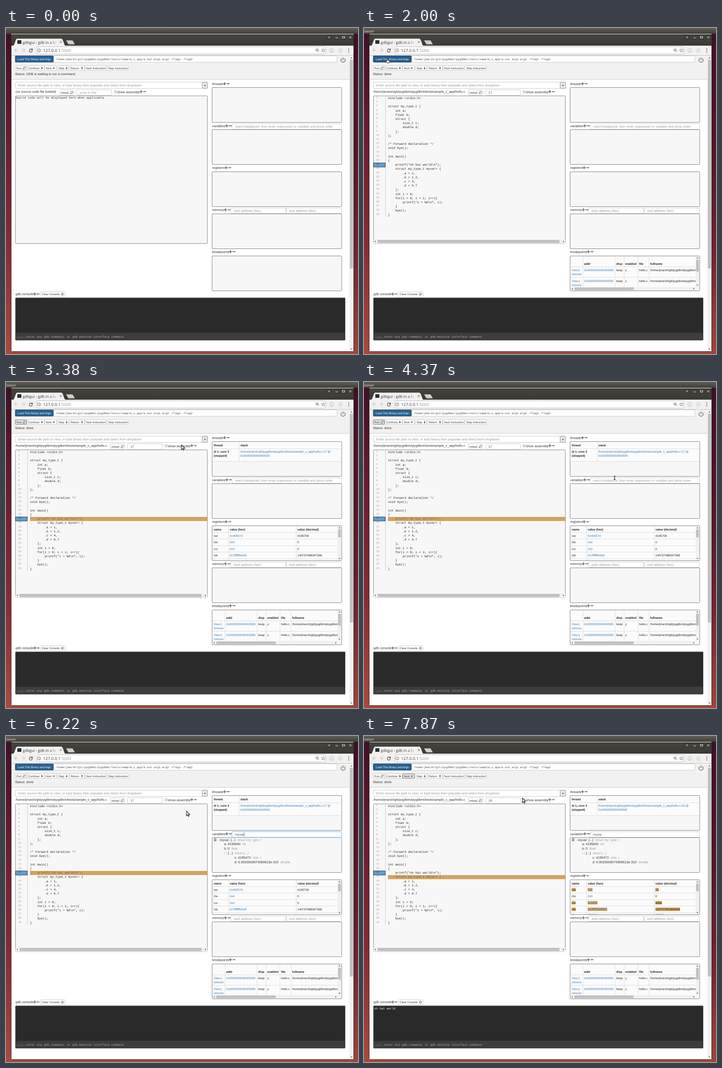
Animation, 778 px wide and 720 px high, one loop 8000 ms. Source, as an HTML page with a canvas:

```html
<!DOCTYPE html>
<html>
<head>
<meta charset="utf-8">
<style>
html, body { margin: 0; width: 100%; height: 100%; overflow: hidden; }
canvas { display: block; }
</style>
</head>
<body>
<canvas id="stage" width="778" height="720"></canvas>
<script>
const ctx = document.getElementById('stage').getContext('2d');
const LOOP = 8000;
const SANS = "'Liberation Sans', Arial, sans-serif";
const MONO = "'Liberation Mono', monospace";
const UI = "'Open Sans', sans-serif";
const BODY = 7.27, CELL = 6.54, SMALL = 6.23;
const INK = '#333', GREY = '#999', LINK = '#337ab7', MARK = '#d2a363';
const APP = '/home/jmarsh/git/pygdbmi/pygdbmi/tests/sample_c_app/';
ctx.textRendering = 'geometricPrecision';

const code = `#include <stdio.h>

struct my_type_t {
    int a;
    float b;
    struct {
        size_t c;
        double d;
    };
};

/* Forward declaration */
void bye();

int main()
{
    printf("oh hai world\\n");
    struct my_type_t myvar= {
        .a = 1,
        .b = 1.2,
        .c = 4,
        .d = 6.7
    };
    int i = 0;
    for(i = 0; i < 1; i++){
        printf("i = %d\\n", i);
    }
    bye();
}`.split('\n');

// label, left, right, icon, icon centre
const buttons = [
  ['Run', 20, 46, 'refresh', 40], ['Continue', 46, 85, 'play', 80],
  ['Next', 85, 112, 'skip', 106], ['Step', 113, 139, 'down', 134],
  ['Return', 140, 174, 'up', 168], ['Next Instruction', 174, 222],
  ['Step Instruction', 223, 271]
];

// time, x, y of the pointer
const path = [
  [250, 72, 94], [700, 64, 80], [1040, 57, 71], [1170, 57, 76], [1430, 52, 68],
  [2130, 52, 68], [2270, 66, 84], [2410, 36, 88], [2690, 36, 88], [2840, 79, 95],
  [2990, 150, 108], [3130, 270, 127], [3380, 388, 139], [3500, 388, 139],
  [3660, 395, 142], [3930, 460, 176], [4400, 560, 214], [4630, 583, 215],
  [5980, 583, 215], [6100, 520, 200], [6220, 399, 166], [6340, 399, 166],
  [6720, 150, 112], [6860, 131, 95], [7000, 97, 88], [7330, 97, 88],
  [7440, 130, 98], [7870, 350, 137], [LOOP, 350, 137]
];

function pointerAt(t) {
  const i = path.findIndex(key => key[0] > t);
  if (i < 1) return null;
  const [a, b] = [path[i - 1], path[i]];
  const k = (t - a[0]) / (b[0] - a[0]);
  return { x: a[1] + (b[1] - a[1]) * k, y: a[2] + (b[2] - a[2]) * k };
}

function text(s, x, y, color = INK, size = BODY, font = SANS, style = '') {
  ctx.font = `${style} ${size}px ${font}`;
  ctx.fillStyle = color;
  ctx.fillText(s, x, y);
  return x + ctx.measureText(s).width;
}

function rect(x, y, w, h, fill) {
  ctx.fillStyle = fill;
  ctx.fillRect(x, y, w, h);
}

function box(x, y, w, h, fill, stroke, r = 1.5) {
  ctx.beginPath();
  ctx.roundRect(x + .5, y + .5, w - 1, h - 1, r);
  ctx.fillStyle = fill;
  ctx.fill();
  ctx.strokeStyle = stroke;
  ctx.lineWidth = 1;
  ctx.stroke();
}

function shape(d, x, y, fill, stroke, width = 1) {
  const p = new Path2D(d);
  ctx.save();
  ctx.translate(x, y);
  if (fill) { ctx.fillStyle = fill; ctx.fill(p); }
  if (stroke) { ctx.strokeStyle = stroke; ctx.lineWidth = width; ctx.stroke(p); }
  ctx.restore();
}

function gradient(y0, y1, ...colors) {
  const g = ctx.createLinearGradient(0, y0, 0, y1);
  colors.forEach((c, i) => g.addColorStop(i / (colors.length - 1), c));
  return g;
}

function ring(x, y, r, color, width = 1) {
  ctx.beginPath();
  ctx.arc(x, y, r, 0, 7);
  ctx.strokeStyle = color;
  ctx.lineWidth = width;
  ctx.stroke();
}

const arrows = {
  up: 'M-2 1L0-1.3L2 1Z', down: 'M-2-1L0 1.3L2-1Z',
  left: 'M1-2L-1.3 0L1 2Z', right: 'M-1-2L1.3 0L-1 2Z'
};

function scrollbar(x, y, w, h, from, to, edge = 4) {
  rect(x, y, w, h, '#f1f1f1');
  if (w > h) {
    rect(from, y + 1, to - from, h - 2, '#c1c1c1');
    shape(arrows.left, x + edge, y + h / 2, '#505050');
    shape(arrows.right, x + w - edge, y + h / 2, '#505050');
  } else {
    rect(x + 1, from, w - 2, to - from, '#c1c1c1');
    shape(arrows.up, x + w / 2, y + edge, '#505050');
    shape(arrows.down, x + w / 2, y + h - edge, '#505050');
  }
}

function icon(name, x, y) {
  const glyphs = {
    play: 'M-2.2-2.6L2.4 0L-2.2 2.6Z',
    skip: 'M-2.2-2.4L1 0L-2.2 2.4ZM1.2-2.4H2V2.4H1.2Z',
    down: 'M-.7-3H.7V0H2.6L0 3L-2.6 0H-.7Z',
    up: 'M-.7 3H.7V0H2.6L0-3L-2.6 0H-.7Z'
  };
  if (name === 'refresh')
    shape('M-2.5-.5A2.5 2.5 0 0 1 2-1.6M2.8-3V-.9H.7M2.5 .5A2.5 2.5 0 0 1-2 1.6M-2.8 3V.9H-.7', x, y, null, '#555', .9);
  else shape(glyphs[name], x, y, '#666');
}

function plusMinus(x, y, gap = 8) {
  shape(`M-3.3 0H3.3M0-3.3V3.3M${gap - 3} 0H${gap + 3}`, x, y, null, '#777', 1.9);
}

function button(label, x, y, w, h, active, focused) {
  box(x, y, w, h, active || focused ? '#e6e6e6' : '#fff', focused ? '#777' : active ? '#adadad' : '#ccc');
  text(label, x + 3, y + h / 2 + 2.2, INK, SMALL);
}

function input(x, y, w, h, value, placeholder, focused) {
  if (focused) box(x - 1, y - 1, w + 2, h + 2, '#fff', '#66afe940', 2);
  box(x, y, w, h, '#fff', focused ? '#8cc3ee' : '#ccc');
  return text(value || placeholder, x + 7, y + h / 2 + 2.8, value ? '#555' : GREY);
}

function desktop(t) {
  rect(0, 0, 12, 720, gradient(12, 720, '#3f1027', '#6c1c30', '#862c36', '#a84a3b'));
  rect(768, 0, 10, 720, gradient(12, 720, '#3f1027', '#551428', '#6e2230', '#a0443a'));
  rect(12, 714, 756, 6, '#a4473a');
  rect(0, 0, 778, 13, gradient(0, 13, '#5f5d55', '#413f3a'));
  if (t >= 2000) text('owser', 0, 10, '#dfdbd2', 8, UI);
  box(11, 14, 758, 701, '#3c3b37', '#2b2a27', 3);
  rect(12, 15, 756, 24, gradient(15, 39, '#45443f', '#3a3935'));
  ['M-1 0H1M0-2V2', 'M-2.5 1.5H2.5', 'M-2.5-2H2.5V2H-2.5Z', 'M-2-2L2 2M2-2L-2 2'].forEach((d, i) => {
    const x = [714, 731, 746, 761][i];
    box(x - 6, 16, 12, 9, '#4a4944', '#2c2b28');
    shape(d, x, 20.5, null, '#dfdbd2');
  });
  shape('M15 39.5C20 39 20 24 25 23.5H122C127 24 128 39 132 39.5Z', 0, 0, '#f2f1f0');
  shape('M133 27.5H147L152 36H138Z', 0, 0, '#cfceca', '#aaa', .5);
  rect(25, 27, 9, 8, '#26323c');
  text('gdbgui - gdb in a br', 37, 34.5, '#333', 8.3, UI);
  const fade = ctx.createLinearGradient(97, 0, 114, 0);
  fade.addColorStop(0, '#f2f1f000');
  fade.addColorStop(1, '#f2f1f0');
  rect(97, 25, 18, 13, fade);
  shape('M-2.3-2.3L2.3 2.3M2.3-2.3L-2.3 2.3', 121, 31, null, '#666');
  rect(12, 39, 756, 22, '#f2f1f0');
  rect(12, 60, 756, 1, '#c4c3c1');
  shape('M4 0H-4M0-4L-4 0L0 4', 23, 49, null, '#ccc', 1.3);
  shape('M-4 0H4M0-4L4 0L0 4', 38, 49, null, '#ccc', 1.3);
  shape('M3-1.5A3.5 3.5 0 1 0 3.4 1M3.5-4V-1H.5', 55, 49.5, null, '#555', 1.3);
  box(68, 41, 639, 17, '#fff', '#bbb', 2);
  ring(73.5, 49.5, 3.6, '#666', .9);
  rect(73, 48.7, 1, 3, '#666');
  rect(73, 47, 1, 1, '#666');
  const end = text('127.0.0.1', 82, 53, '#333', 9.1, UI);
  text(':5000', end, 53, '#999', 9.1, UI);
  ring(687.5, 48.5, 2.7, '#666');
  shape('M2 2L4.5 4.5M-1.4 0H1.4', 687.5, 48.5, null, '#666');
  shape('M0-4L1.2-1.3L4-1.2L1.8.7L2.6 3.6L0 2L-2.6 3.6L-1.8.7L-4-1.2L-1.2-1.3Z', 701, 49.5, null, '#666', .8);
  ring(720, 49.5, 4.4, '#bbb');
  text('{}', 717.7, 51.5, '#bbb', 6);
  ring(739, 49.5, 4.4, '#ccc');
  shape('M-2 2L2-2', 739, 49.5, null, '#ccc', 2);
  for (let i = -1; i < 2; i++) rect(756.7, 48.7 + i * 3.5, 1.8, 1.8, '#555');
  rect(12, 61, 747, 653, '#fff');
  scrollbar(759, 61, 9, 653, 70, 531, 5);
}

function toolbar(t, pointer, focus) {
  const over = (x0, x1, y0, y1) => pointer && pointer.x >= x0 && pointer.x <= x1 && pointer.y >= y0 && pointer.y <= y1;
  rect(12, 61, 747, 52, '#f1f1f1');
  rect(12, 113, 747, 1, '#ccc');
  const onLoad = over(20, 105, 61, 76);
  box(20, 61, 85, 15, onLoad ? '#265c8b' : '#286192', focus === 'Load' ? '#204d74' : '#245580', 1);
  text('Load This Binary and Args', 26, 71, '#fff', SMALL);
  box(105, 61, 627, 15, '#fff', '#ccc', 1);
  text(APP + 'a.out arg1 arg2 -flag1 -flag2', 110, 70.5, '#444', 6.22, MONO);
  shape('M-2.7-3.8A4.7 4.7 0 1 0 2.7-3.8M0-6V0', 745, 71, null, '#666', 1.3);
  let hit = onLoad;
  for (const [label, x0, x1, glyph, gx] of buttons) {
    const active = over(x0, x1, 83, 94);
    hit = hit || active;
    button(label, x0, 83, x1 - x0, 11, active, focus === label);
    if (glyph) icon(glyph, gx, 88.7);
  }
  text('Status: ' + (t < 2000 ? 'GDB is waiting to run a command' : 'done'), 20, 104);
  return hit ? 'hand' : over(499, 742, 211, 223) ? 'beam' : 'arrow';
}

function source(t) {
  const loaded = t >= 2000, dx = loaded ? 112 : 0;
  const line = t >= 7440 ? 18 : t >= 2990 ? 17 : 0;
  input(20, 119, 414, 15, '', 'Enter source file path to view, or load binary then populate and select from dropdown');
  box(433, 119, 13, 15, '#e4e4e4', '#999');
  shape(arrows.down, 439.7, 127, '#333');
  text(loaded ? APP + 'hello.c' : '(no source code file loaded)', 21, 143);
  button('reload', 118 + dx, 136, 33, 13);
  icon('refresh', 145 + dx, 142.7);
  input(156 + dx, 136, 78, 13, loaded ? String(line || 17) : '', 'jump to line');
  box(239 + dx, 138, 6, 6, '#e8e8e8', '#aaa', 1);
  text('show assembly', 246 + dx, 144);
  plusMinus(298.5 + dx, 140.5);
  box(20.4, 149.4, 425.2, 327, '#f7f7f7', '#808080');
  if (!loaded) {
    text('Source code will be displayed here when applicable', 21, 156, INK, CELL, MONO);
    return;
  }
  rect(47, 150, 1, 266, '#ccc');
  box(20.5, 297.5, 27, 10, '#5f9fd3', '#333', 0);
  if (line) rect(53, 298 + (line - 17) * 9.2, 392, 9, MARK);
  code.forEach((s, i) => {
    const y = 157 + i * 9.2, marked = i + 1 === line;
    text(i + 1, 27, y - 2, i === 16 ? '#234' : GREY, 5.6, MONO);
    text(s, 53, y, marked ? '#7a6038' : '#222', 6.74, MONO);
  });
  scrollbar(21, 467, 424, 9, 30, 432);
}

function table(lines, top, bottom, columns, labels, labelY, right) {
  rect(456, top, right - 456, bottom - top, '#fbfbfb');
  for (const y of lines) rect(456, y, right - 456, 1, '#ddd');
  for (const x of columns.slice(1)) rect(x - 3, top, 1, bottom - top, '#ddd');
  labels.forEach((s, i) => text(s, columns[i], labelY, '#222', CELL, SANS, 'bold'));
}

function clipped(x, y, w, h, draw) {
  ctx.save();
  ctx.beginPath();
  ctx.rect(x, y, w, h);
  ctx.clip();
  draw();
  ctx.restore();
}

function threads(stepped) {
  table([147, 175], 132, 175, [459, 518], ['thread', 'stack'], 142, 741);
  text('id 1, core 3', 459, 156, '#222', CELL, SANS, 'bold');
  text('(stopped)', 459, 165, '#222', CELL, SANS, 'bold');
  text(`${APP}hello.c:${stepped ? 18 : 17} @`, 518, 156, LINK, CELL);
  text(stepped ? '0x000000000040058f' : '0x0000000000400585', 518, 165, LINK, CELL);
}

function variables() {
  shape('M-2.5-2H2.5M-1-3H1M-2-1.5V3H2V-1.5M-.7-.5V2M.7-.5V2', 462.3, 229, null, '#666', .9);
  [['- myvar: {...}', 'struct my_type_t', 468], ['a: 4195840', 'int', 482], ['b: 0', 'float', 482],
    ['- : {...}', 'struct {...}', 482], ['c: 4195472', 'size_t', 505], ['d: 6.9533558074389613e-310', 'double', 505]
  ].forEach(([value, type, x], i) => {
    const y = 231.5 + i * 9.8;
    text(type, text(value, x, y) + 4.2, y, GREY, BODY, SANS, 'italic');
  });
}

function registers(changed) {
  const columns = [459, 494.5, 644];
  const rows = changed
    ? ['rax 0xd 13', 'rbx 0x0 0', 'rcx 0x1000 4096', 'rdx 0x7ffff7dd59e0 140737351866848', 'rsi 0x7ffff7 41943']
    : ['rax 0x40057d 4195709', 'rbx 0x0 0', 'rcx 0x0 0', 'rdx 0x7fffffffe0e8 140737488347368'];
  clipped(456, 318, 285, 76, () => {
    table([332, 346, 361, 375, 390], 318, 394, columns, ['name', 'value (hex)', 'value (decimal)'], 327.5, 733);
    rows.forEach((row, i) => row.split(' ').forEach((s, c) => {
      const y = 341.7 + i * 14.4;
      if (changed && i !== 1) {
        ctx.font = `${CELL}px ${SANS}`;
        rect(columns[c], y - 6, ctx.measureText(s).width, 7.5, '#d9a557');
      }
      text(s, columns[c], y, c === 1 ? LINK : '#222', CELL);
    }));
    scrollbar(733, 318, 8, 76, 326, 343);
  });
}

function breakpoints() {
  const columns = [459, 486.5, 557.5, 577.5, 608, 632.5];
  clipped(456, 504, 277, 68, () => {
    table([527, 550], 504, 572, columns, ['', 'addr', 'disp', 'enabled', 'file', 'fullname'], 522.5, 733);
    for (const y of [537, 561]) {
      text(' |', text('View', 459, y, LINK, CELL), y, INK, CELL);
      text('remove', 459, y + 9, LINK, CELL);
      ['0x0000000000400585', 'keep', 'y', 'hello.c', APP + 'hello.c'].forEach((s, i) =>
        text(s, columns[i + 1], y, i ? '#222' : LINK, CELL));
    }
  });
  scrollbar(733, 504, 8, 68, 512, 538);
  scrollbar(456, 572, 277, 8, 465, 596);
}

function panels(t, focus) {
  [['threads', 125.5, 131, 483], ['variables', 218.5, 224, 488], ['registers', 311, 317, 486.5],
    ['memory', 404, 410, 485], ['breakpoints', 496.5, 503, 496]
  ].forEach(([label, baseline, top, x]) => {
    text(label, 455.5, baseline);
    plusMinus(x, baseline - 2.5);
    box(455, top, 287.5, 78, '#f7f7f7', '#808080');
  });
  const typed = 'myvar'.slice(0, [4920, 5050, 5290, 5410, 5530].filter(at => t >= at).length);
  const focused = focus === 'variable';
  const end = input(499, 211, 243, 13, typed, 'reach breakpoint, then enter expression or variable and press enter', focused);
  if (focused) rect(typed ? end : 506, 213.5, .8, 8, '#333');
  input(496, 397, 123, 13, '', 'start address (hex)');
  input(619, 397, 123, 13, '', 'end address (hex)');
  if (t >= 3130) threads(t >= 7440);
  if (t >= 5680) variables();
  if (t >= 3250) registers(t >= 7550);
  if (t >= 2000) breakpoints();
}

function terminal(t) {
  text('gdb console', 21, 590);
  plusMinus(63.5, 587.5, 7.5);
  button('Clear Console', 76, 582, 55, 12);
  ring(124.7, 588, 2.5, '#555', .9);
  shape('M-1.7 1.7L1.7-1.7', 124.7, 588, null, '#555', .9);
  box(20.5, 595.5, 729.5, 94.5, '#2a2a2a', '#4f4f4f', 1);
  rect(21, 673, 728, 16, '#3d3d3d');
  if (t >= 7440) text('oh hai world', 22.5, 604, '#fff', CELL, MONO);
  text('(gdb)', 22.5, 685, '#6c6c6c', CELL, MONO);
  text('enter any gdb command, or gdb machine interface command', 44.5, 684, '#aaa', CELL, MONO);
}

function drawPointer({ x, y }, kind) {
  if (kind === 'hand')
    shape('M-1 0Q0-1 1 0V3.2L4.3 4.2Q5 4.5 4.8 6L4 9H-1L-3.2 5.6Q-2.6 4-1 5Z', x, y, '#fff', '#111', .9);
  else if (kind === 'beam')
    shape('M-2.2-3.5H2.2M0-3.5V3.5M-2.2 3.5H2.2', x, y, null, '#222', 1.2);
  else
    shape('M0 0V10.2L2.4 8L4 11.6L5.8 10.8L4.2 7.3H7.4Z', x, y, '#fff', '#111', 1.1);
}

function frame(now) {
  const t = now % LOOP;
  const pointer = pointerAt(t);
  const focus = t < 1860 ? '' : t < 2690 ? 'Load' : t < 4520 ? 'Run' : t < 7200 ? 'variable' : 'Next';
  desktop(t);
  const kind = toolbar(t, pointer, focus);
  source(t);
  panels(t, focus);
  terminal(t);
  if (pointer) drawPointer(pointer, kind);
  requestAnimationFrame(frame);
}
requestAnimationFrame(frame);
</script>
</body>
</html>
```
